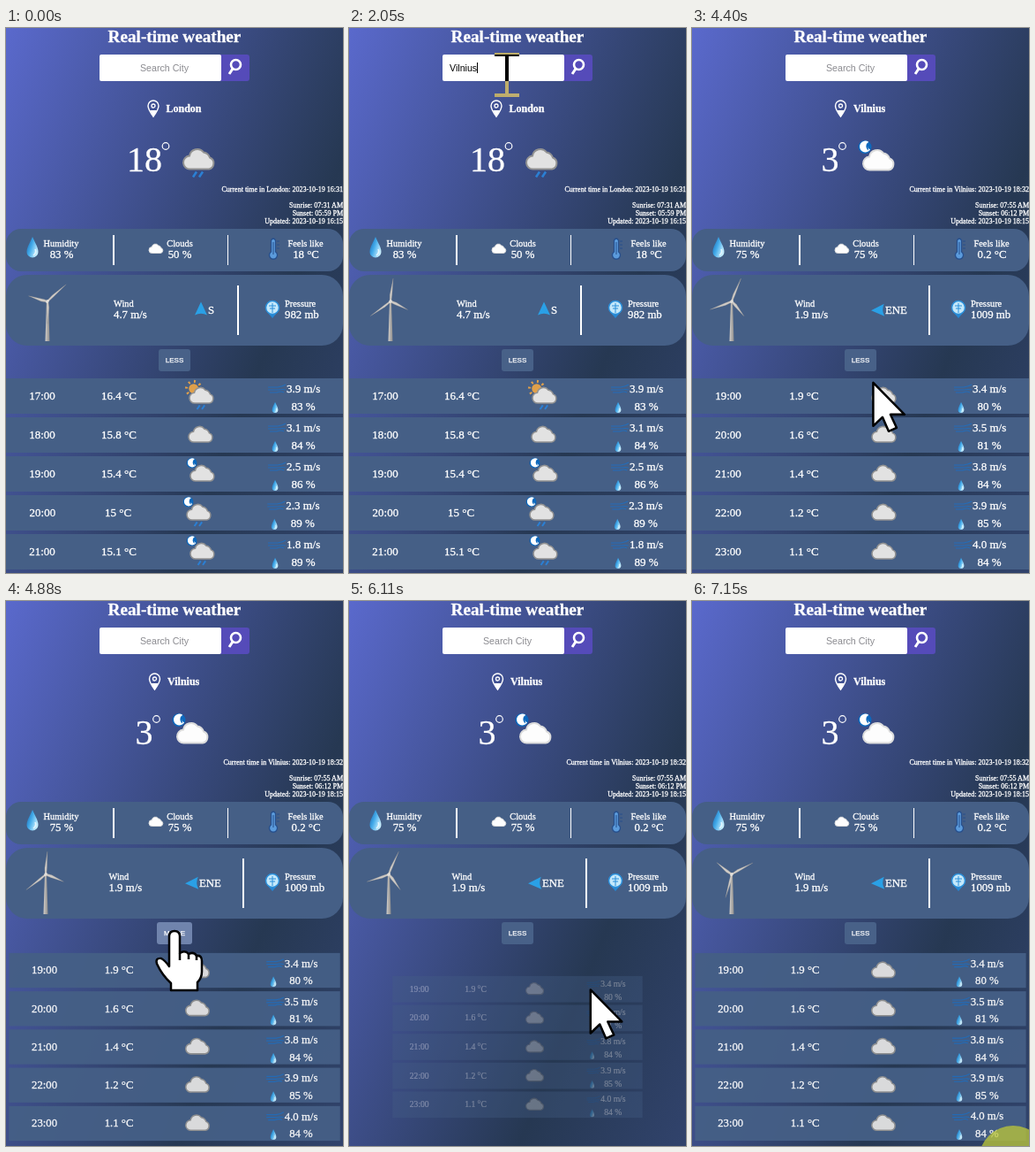
An HTML page that plays this animation: 382 by 616 pixels, repeating every 7210 ms.

```html
<!DOCTYPE html>
<html lang="en">
<head>
<meta charset="utf-8">
<title>Real-time weather</title>
<style>
html, body { margin: 0; height: 100%; overflow: hidden; background: #3a4a80 }
svg { display: block; width: 100vw; height: 100vh }
text { font-family: "Liberation Serif", "Times New Roman", serif; fill: #fff; stroke: #fff; stroke-width: .3; white-space: pre }
.sans { font-family: "Liberation Sans", Arial, sans-serif; stroke-width: 0 }
#label { stroke-width: .25 }
#ibeam { fill: #fff; mix-blend-mode: difference }
</style>
</head>
<body>
<svg id="stage" viewBox="0 0 382 616" preserveAspectRatio="none"></svg>
<script>
const LOOP = 7210, SUBMIT = 2600, REFRESH = 3400, CLOSE = 4760, OPEN = 5800;
const PANEL = '#455f86';

const text = (x, y, s, size = 12.8, anchor = 'start', extra = '') =>
  `<text x="${x}" y="${y}" font-size="${size}" text-anchor="${anchor}" ${extra}>${s}</text>`;
const mid = (x, y, s, size) => text(x, y, s, size, 'middle');
const box = (x, y, w, h, fill, r = 0) =>
  `<rect x="${x}" y="${y}" width="${w}" height="${h}" rx="${r}" fill="${fill}"/>`;
const at = (x, y, body, scale = 1) =>
  `<g transform="translate(${x} ${y}) scale(${scale})">${body}</g>`;

const cloud = (fill, line) =>
  `<path d="M8 25a7.5 7.5 0 0 1-1-15a9 9 0 0 1 16-4a9 9 0 0 1 7 6a6.8 6.8 0 0 1-1 13z" fill="${fill}" stroke="${line}" stroke-width="2"/>`;
const sun = color =>
  `<circle cx="6" cy="4" r="7" fill="${color}"/><circle cx="6" cy="4" r="10.5" fill="none" stroke="${color}" stroke-width="4" stroke-dasharray="2.5 5.75"/>`;
const parts = {
  o: sun('#e0a04a'),
  y: sun('#f6cf45'),
  m: '<circle cx="2" cy="-1" r="7.500" fill="#0c68bd"/><path d="M6-7a6.500 6.500 0 1 0 2 9a6 6 0 0 1-2-9z" fill="#fff"/><path d="M5-6a6 6 0 0 0 1 9z" fill="#0c68bd"/>',
  w: cloud('#fdfdfd', '#dcdcdc'),
  g: cloud('#e2e2e2', '#929292'),
  r: '<path d="M15 28l-4 6m11-6l-4 6" stroke="#2b7fd3" stroke-width="2.6" fill="none"/>'
};
const icon = (kinds, x, y, scale) => at(x, y, [...kinds].map(k => parts[k]).join(''), scale);
const drop = (x, y, scale) => at(x, y,
  '<path d="M0-12C3-5 6.500 0 6.500 5a6.500 6.500 0 0 1-13 0C-6.500 0-3-5 0-12z" fill="url(#water)"/><path d="M3 2q2 4-2 7" stroke="#e6f7ff" stroke-width="1.500" fill="none"/>', scale);
const gust = (x, y) => at(x, y,
  '<path d="M-10-2h11q6-1 9-3M-10 1h12q4-1 8 0M-8 4h8q5-2 8 0" fill="none" stroke="#246db9" stroke-width="1.200"/>');

function rows(data) {
  return data.map(([time, temp, kinds, ix, wind, humid], i) => {
    const y = 396 + i * 44, short = Math.max(0, 2 - temp.length);
    const gap = Math.max(0, 3 - temp.length) * .8;
    return box(0, y, 382, 40, PANEL) +
      mid(41 + gap / 2, y + 24, time + ':00', 13) +
      mid((temp.length > 3 ? 128 : 127) - short, y + 24, temp + ' °C', 13) +
      icon(kinds, ix, y + 8.5, .78) +
      gust(307 - gap, y + 12) + text(318 - gap, y + 16, wind + ' m/s', 13) +
      drop(305 - gap, y + 33, .52) + mid(337 - gap, y + 36, humid + ' %', 13);
  }).join('');
}

const londonRows = [
  [17, '16.4', 'ogr', 208, '3.9', 83], [18, '15.8', 'g', 207, '3.1', 84],
  [19, '15.4', 'mg', 209, '2.5', 86], [20, '15', 'mgr', 205, '2.3', 89],
  [21, '15.1', 'mgr', 209, '1.8', 89]
];
const vilniusRows = [
  [17, '3', 'yw', 203, '2.3', 73], [18, '3', 'mw', 203, '1.9', 75],
  [19, '1.9', 'g', 204, '3.4', 80], [20, '1.6', 'g', 204, '3.5', 81],
  [21, '1.4', 'g', 204, '3.8', 84], [22, '1.2', 'g', 204, '3.9', 85],
  [23, '1.1', 'g', 204, '4.0', 84]
];

const pin = '<path d="M0 9Q-6 1-6-3a6 6 0 0 1 12 0Q6 1 0 9z" fill="none" stroke="#fff" stroke-width="1.400"/><path d="M-4 2h8L0 10z" fill="#fff"/><circle cy="-3" r="2" fill="none" stroke="#fff" stroke-width="1.300"/>';

const city = c => `<g id="${c.id}">` +
  at(c.pin, 91, pin) + text(c.pin + 14.5, 95, c.name, 12, 'start', 'font-weight="bold"') +
  text(c.ring - 4, 162, c.temp, 40, 'end') +
  `<circle cx="${c.ring}" cy="133.500" r="3.800" fill="none" stroke="#fff" stroke-width="1.200"/>` +
  icon(c.sky, c.skyX, c.skyY) +
  text(382, 185, `Current time in ${c.name}: 2023-10-19 <tspan class="clock">16:31</tspan>`, 8, 'end') +
  text(382, 203, `Sunrise: ${c.rise} AM`, 8, 'end') +
  text(382, 212, `Sunset: ${c.set} PM`, 8, 'end') +
  text(382, 221, `Updated: 2023-10-19 ${c.updated}`, 8, 'end') +
  mid(63, 260, c.humid + ' %') + mid(197, 260, c.clouds + ' %') + mid(340, 260, c.feels + ' °C') +
  text(c.windX, 315, 'Wind', 10.4) + text(c.windX, 328, c.wind + ' m/s') +
  `<path d="M0-7.500L7 7.500Q0 4-7 7.500z" fill="#2aa0e6" transform="translate(${c.arrow}) rotate(${c.turn})"/>` +
  text(c.dirX, 323, c.dir) + box(c.bar, 291, 2, 56, '#fff') +
  text(316, 328, c.press + ' mb') +
  at(c.hub, 309, '<path d="M-1 0h2l1.500 45h-5z" fill="url(#steel)"/><g class="rotor"></g>') + '</g>';

const london = {
  id: 'london', name: 'London', pin: 167, temp: '18', ring: 181, sky: 'gr', skyX: 201, skyY: 134.5,
  rise: '07:31', set: '05:59', updated: '16:15', humid: 83, clouds: 50, feels: '18',
  windX: 122, wind: '4.7', arrow: '221 317', turn: 0, dir: 'S', dirX: 229, bar: 262, press: 982, hub: 47
};
const vilnius = {
  id: 'vilnius', name: 'Vilnius', pin: 168.5, temp: '3', ring: 170.5, sky: 'mw', skyX: 194, skyY: 135.5,
  rise: '07:55', set: '06:12', updated: '18:15', humid: 75, clouds: 75, feels: '0.2',
  windX: 116.5, wind: '1.9', arrow: '210.500 319', turn: 268, dir: 'ENE', dirX: 219, bar: 268, press: 1009, hub: 45
};

const stage = document.getElementById('stage');
stage.innerHTML = `<defs>
  <linearGradient id="sky" gradientUnits="userSpaceOnUse" x1="-80" y1="198" x2="462" y2="418">
    <stop stop-color="#5a69cc"/><stop offset=".7" stop-color="#263852"/><stop offset="1" stop-color="#31436c"/>
  </linearGradient>
  <linearGradient id="water" x2="1" y2=".6">
    <stop stop-color="#125ca8"/><stop offset=".5" stop-color="#43abea"/><stop offset="1" stop-color="#c8efff"/>
  </linearGradient>
  <linearGradient id="steel"><stop stop-color="#d2cec9"/><stop offset="1" stop-color="#8e8d8c"/></linearGradient>
</defs>` +
  box(0, 0, 382, 616, 'url(#sky)') +
  text(191, 16, 'Real-time weather', 19.2, 'middle', 'font-weight="bold"') +
  box(236, 30, 40, 30, '#554bb9', 3) + box(106, 30, 138, 30, '#fff', 2) +
  '<path d="M257 46l-4 6" stroke="#fff" stroke-width="3"/><circle cx="260.500" cy="41.500" r="5.500" fill="none" stroke="#fff" stroke-width="2.600"/>' +
  text(179.5, 49, 'Search City', 10.67, 'middle', 'id="hint" class="sans" style="fill:#8b8b90"') +
  text(114, 49, '', 10.67, 'start', 'id="typed" class="sans" style="fill:#000"') +
  '<path id="caret" d="M.500 39v12" stroke="#000"/>' +
  box(0, 227, 382, 48, PANEL, 17) + box(0, 279, 382, 80, PANEL, 24) +
  drop(30, 248) + mid(62.5, 247, 'Humidity', 10.4) + box(121, 234, 2, 34, '#fff') +
  icon('w', 162, 243, .46) + mid(197, 247, 'Clouds', 10.4) + box(251, 234, 1, 34, '#fff') +
  '<path d="M300.500 253v-13q2.500-4 5 0v13a4.500 4.500 0 1 1-5 0z" fill="#5b9bdc" stroke="#274f8c" stroke-width="1.300"/><path d="M303 242v14" stroke="#274f8c"/><path d="M307 241h3m-3 4h3m-3 4h3" stroke="#274f8c"/>' +
  mid(339.5, 247, 'Feels like', 10.4) +
  '<path d="M296 321l6 7 6-7z" fill="#2787d2"/><circle cx="302" cy="316" r="7.500" fill="#c4e8fb" stroke="#2b8fda" stroke-width="1.500"/><path d="M298 314h8m-7 3h6m-3-6v11" stroke="#2b8fda"/>' +
  text(316, 315, 'Pressure', 10.4) +
  city(london) + city(vilnius) +
  '<g id="list">' +
  [londonRows, vilniusRows.slice(0, 5), vilniusRows.slice(2)].map(r => `<g>${rows(r)}</g>`).join('') + '</g>' +
  '<rect id="button" y="363" height="25" rx="3"/>' +
  text(191, 378, '', 8, 'middle', 'id="label" class="sans"') +
  '<path id="ibeam" d="M-14-25h28v4h-12v42h12v4h-28v-4h12v-42h-12z"/>' +
  '<path id="arrow" d="M.500 1V50L11 40L18 56L27 52L20 37H36z" fill="#fff" stroke="#000" stroke-width="2.500" stroke-linejoin="round"/>' +
  '<g id="hand" stroke="#000" stroke-width="2.500"><path d="M-6 5q0-6 6-6q6 0 6 6v19q6-4 10 1q6-3 9 2q6-1 6 6v12q0 7-5 12v9h-30v-8q-10-9-16-22q-2-7 5-6q4 2 9 9z" fill="#fff" stroke-linejoin="round"/><path d="M6 24v8m10-7v6m9-4v5"/></g>' +
  '<circle id="halo" cx="364" cy="632" r="39" fill="#bec837" fill-opacity=".75"/>';

const $ = id => document.getElementById(id);
const show = (el, on) => el.style.display = on ? '' : 'none';
const rotors = document.querySelectorAll('.rotor');
rotors.forEach(r => r.innerHTML = [0, 120, 240].map(a =>
  `<path d="M0-1L8-1.800L27 0L8 1L0 1z" fill="#d0ccc7" stroke="#8f8c8a" stroke-width=".3" transform="rotate(${a})"/>`).join('') +
  '<circle r="2" fill="#e2dfdb"/>');

// Linear interpolation over [time, ...values] keys
function track(keys, t) {
  const last = keys.length - 1;
  const i = keys.findIndex(k => k[0] > t);
  if (i < 0) return keys[last].slice(1);
  if (i === 0) return keys[0].slice(1);
  const a = keys[i - 1], b = keys[i], p = (t - a[0]) / (b[0] - a[0]);
  return a.slice(1).map((v, j) => v + (b[j + 1] - v) * p);
}

// cubic-bezier(.25, .1, .25, 1)
function ease(p) {
  if (p <= 0) return 0;
  if (p >= 1) return 1;
  const curve = (u, a, b) => 3 * (1 - u) ** 2 * u * a + 3 * (1 - u) * u * u * b + u ** 3;
  let lo = 0, hi = 1;
  for (let i = 0; i < 20; i++) {
    const m = (lo + hi) / 2;
    if (curve(m, .25, .25) < p) lo = m; else hi = m;
  }
  return curve(lo, .1, 1);
}

const spin = [[0, 13], [900, 194], [3100, 666], [4400, 939], [5230, 1110], [6110, 1301], [7150, 1590], [LOOP, 1603]];
const pointer = [
  [70, 305, 525], [420, 210, 70], [560, 197, 39], [800, 179, 53], [3780, 179, 53], [4100, 344, 541],
  [4400, 205, 400], [4540, 191, 374], [5880, 191, 374], [6110, 273, 438], [6500, 390, 625]
];
const pointerAt = t =>
  t < 70 || t > 6500 ? '' : t < 490 ? 'arrow' : t < 3780 ? 'ibeam' : t < 4540 ? 'arrow' : t < 5900 ? 'hand' : 'arrow';

const closing = t => 1 - ease((t - CLOSE) / 2000);
function openness(t) {
  if (t < OPEN) return closing(t);
  const low = closing(OPEN);
  return low + (1 - low) * ease((t - OPEN) / 1900);
}

function draw(t) {
  const moved = t >= SUBMIT, fresh = t >= REFRESH;
  show($('london'), !moved);
  show($('vilnius'), moved);
  document.querySelectorAll('.clock').forEach(c => c.textContent = fresh ? '18:32' : '16:31');
  // The rotor is seen at an angle, so its circle is a tilted ellipse
  const [angle] = track(spin, t);
  rotors.forEach(r => r.setAttribute('transform', `rotate(-52) scale(1.07 .8) rotate(${angle})`));

  const typed = $('typed');
  typed.textContent = moved ? '' : 'Vilnius'.slice(0, Math.max(0, Math.floor((t - 1450) / 96) + 1));
  show($('hint'), !typed.textContent);
  const focus = moved ? SUBMIT : t >= 1450 ? 2120 : 780;
  show($('caret'), t >= 780 && t < CLOSE && Math.floor(Math.max(0, t - focus) / 530) % 2 === 0);
  $('caret').setAttribute('transform', `translate(${114 + Math.round(typed.getComputedTextLength())} 0)`);

  const list = $('list'), open = openness(t), scale = .6 + .4 * open;
  [...list.children].forEach((g, i) => show(g, i === moved + fresh));
  list.setAttribute('opacity', open);
  list.setAttribute('transform', `translate(191 504) scale(${scale}) translate(-191 -504)`);

  const kind = pointerAt(t), more = t >= CLOSE && t < OPEN, width = more ? 40 : 36;
  $('label').textContent = more ? 'MORE' : 'LESS';
  $('button').setAttribute('x', 191 - width / 2);
  $('button').setAttribute('width', width);
  $('button').setAttribute('fill', kind === 'hand' ? '#7084ad' : '#486188');

  const [x, y] = track(pointer, t);
  for (const id of ['arrow', 'ibeam', 'hand']) {
    show($(id), id === kind);
    $(id).setAttribute('transform', `translate(${x} ${y})`);
  }
  show($('halo'), t >= 7000);
}

function tick() {
  draw(performance.now() % LOOP);
  requestAnimationFrame(tick);
}
tick();
</script>
</body>
</html>
```
